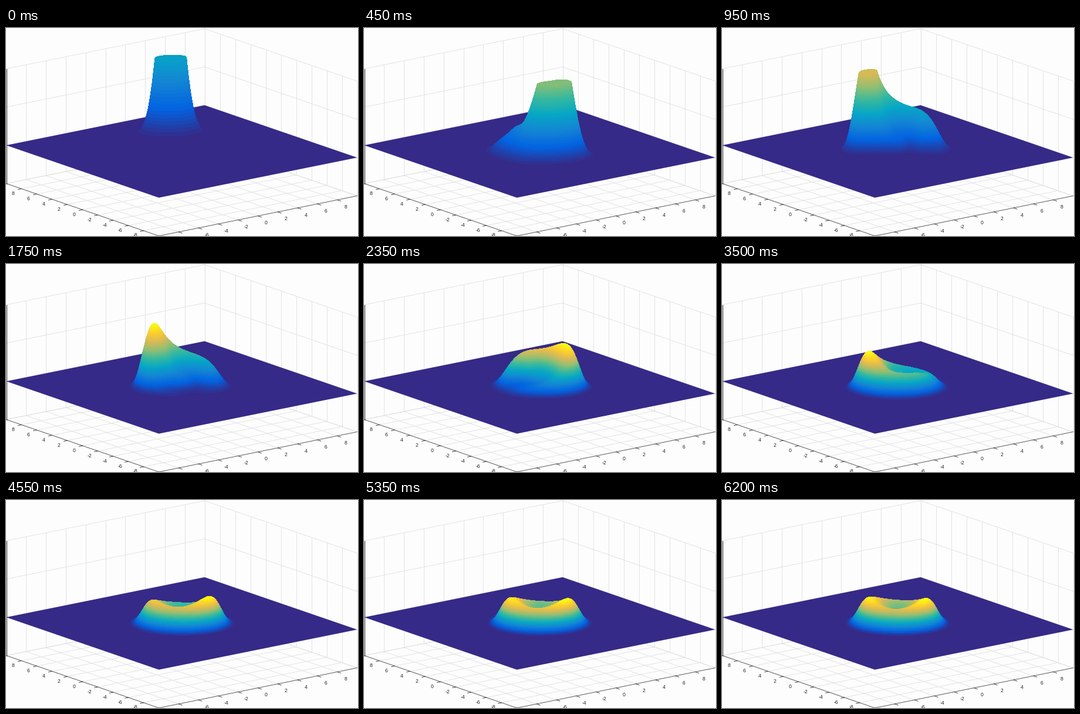
Write a matplotlib script that moves like this. It is 600 px wide and 355 px high and loops after 6250 ms.

```python
import numpy as np
import matplotlib.pyplot as plt
from matplotlib.animation import FuncAnimation
from matplotlib.colors import LinearSegmentedColormap

W, H = 600, 355
FRAMES, STEP = 125, 50
CX, CY = 299.5, 210.7           # screen position of the plane's centre
UX, UY = (16.9, -3.42), (-13.0, -4.47)
UZ = 65.3                       # pixels per z tick
SU, SD = 21.3, 5.6              # pixels per unit across and in depth
CLIP = 2 * UZ
DARK = "#262626"

CMAP = LinearSegmentedColormap.from_list(
    "surface", ["#352a87", "#0363e1", "#1485d4", "#06a7c6", "#38b99e",
                "#92bf73", "#d9ba56", "#fcce2e", "#f9fb0e"], N=64)


def project(x, y, z=0):
    return CX + x * UX[0] + y * UY[0], CY + x * UX[1] + y * UY[1] - z * UZ


fig = plt.figure(figsize=(W / 100, H / 100), dpi=100, facecolor="#fdfdfd")
ax = fig.add_axes([0, 0, 1, 1])
ax.axis("off")


def line(a, b, color="#dfdfdf", width=0.6, order=1):
    (x0, y0), (x1, y1) = project(*a), project(*b)
    ax.plot([x0, x1], [y0, y1], color=color, lw=width, zorder=order)


def label(x, y, value):
    ax.text(x, y, str(value), size=6.2, family="Liberation Sans",
            color=DARK, ha="center", va="center", zorder=5)


def draw_box():
    for v in range(-10, 11, 2):
        line((v, 10, -1), (v, 10, 2))
        line((10, v, -1), (10, v, 2))
        line((v, -10, -1), (v, 10, -1))
        line((-10, v, -1), (10, v, -1))
    for z in (-1, 0, 1, 2):
        line((-10, 10, z), (10, 10, z))
        line((10, -10, z), (10, 10, z))
    line((-10, 10, -1), (-10, 10, 2), DARK, 0.7, 4)
    line((-10, 10, -1), (-10, -10, -1), "#484848", 0.6, 4)
    line((-10, -10, -1), (10, -10, -1), "#484848", 0.6, 4)
    for v in range(-8, 9, 2):
        line((-10, v, -1), (-10.35, v, -1), DARK, 0.6, 4)
        line((v, -10, -1), (v, -10.45, -1), DARK, 0.6, 4)
        x, y = project(-10, v, -1)
        label(x - 14.5, y + 8, v)
        x, y = project(v, -10, -1)
        label(x + 14, y + 12, v)
    corners = [project(*c) for c in ((-10, 10), (10, 10), (10, -10), (-10, -10))]
    ax.fill(*zip(*corners), color=CMAP(0), lw=0, zorder=2)


# Pixel window of the hill, and its depth samples from front to back
X0, X1, Y0, Y1 = 160, 425, 30, 255
u = (np.arange(X0, X1) + 0.5 - CX) / SU
d = np.linspace(-7, 8.5, 240)
rows = CY - (np.arange(Y0, Y1) + 0.5)
U, D = np.meshgrid(u, d)


def phase(t):
    lag = 46 / (1 + np.exp((t - 1700) / 400))
    return np.radians(172 + 0.427 * (t - 1750) - lag)


def blob(t):
    """Compact peak spiralling in towards the cycle."""
    a, r = phase(t), 2.5 + 2.9 * np.exp(-t / 150)
    along = U * np.cos(a) + D * np.sin(a) - r
    across = D * np.cos(a) - U * np.sin(a)
    wide = 0.9 * (1 + t / 1000)
    return 370 * np.exp(-t / 1600 - (along / 0.6) ** 2 / 2 - (across / wide) ** 2 / 2)


def ring(t):
    """Two-peaked crater times a circling, fading wave with a trailing tail."""
    s = 1 + 0.15 * np.exp(-(t / 1150) ** 4)
    x, y = U / s, D / s
    r2 = x * x + y * y
    rest = 25.5 * np.exp(0.197 * x * x + 0.125 * y * y - 0.025 * x * y
                         - 0.016 * r2 ** 2 - 0.0004 * r2 ** 3)
    phi = np.arctan2(y, x)
    a = 0.44 + 0.0006 * (t - 1750)
    spread = (a + np.sqrt(a * a + 0.16)) / 2
    q = np.exp(-spread) * (1 - np.exp(-r2 / 1.2))
    turn = phi + 0.2 * np.sin(2 * phi) - phase(t)
    turn = turn + np.minimum(1.3 * q * q, 0.8) * (1 - np.cos(turn))
    wave = 1 + 2 * sum(q ** (k * k) * np.cos(k * turn) for k in range(1, 8))
    return rest * np.maximum(wave, 0)


def height(t):
    w = 1 / (1 + np.exp((t - 400) / 70))
    z = (1 - w) * ring(t)
    return z + w * blob(t) if w > 1e-4 else z


def render(t):
    z = height(t)
    skyline = np.maximum.accumulate(SD * D + np.minimum(z, CLIP), axis=0)
    hit = (skyline[:, None, :] < rows[None, :, None]).sum(axis=0)
    seen = hit < len(d)
    depth = d[np.minimum(hit, len(d) - 1)] - (d[1] - d[0]) / 2
    level = np.minimum(rows[:, None] - SD * depth, CLIP)
    rgba = CMAP(np.clip(level / z.max(), 0, 1))
    rgba[..., 3] = seen & (level > 0.4)
    return rgba


draw_box()
hill = ax.imshow(render(0), extent=(X0, X1, Y1, Y0), interpolation="nearest",
                 aspect="auto", zorder=3)
ax.set_xlim(0, W)
ax.set_ylim(H, 0)


def update(i):
    hill.set_data(render(i * STEP))
    return [hill]


anim = FuncAnimation(fig, update, frames=FRAMES, interval=STEP,
                     repeat=True, repeat_delay=0)
plt.show()
```
